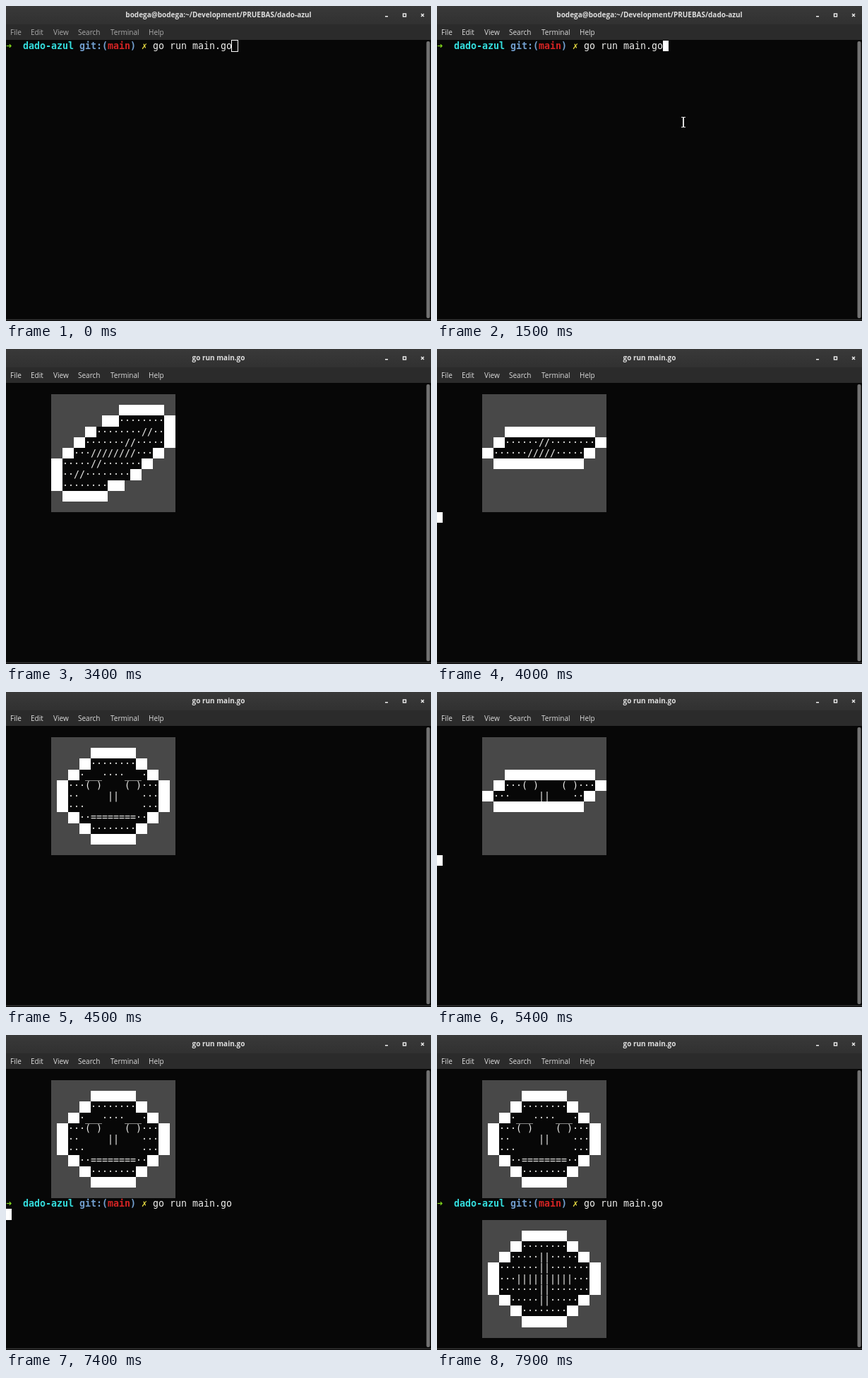
An HTML page with a canvas that plays this animation: 602 px wide and 446 px high, repeating every 8 s.

```html
<!DOCTYPE html>
<html>
<head>
<meta charset="utf-8">
<style>
  html, body { margin: 0; width: 602px; height: 446px; overflow: hidden; background: #070707; }
  canvas { display: block; }
</style>
</head>
<body>
<canvas id="stage" width="602" height="446"></canvas>
<script>
const ctx = document.getElementById('stage').getContext('2d');
const LOOP = 8000, CELL = 8;
const MONO = '13.3px "DejaVu Sans Mono", monospace';
const UI = '"Open Sans", "Noto Sans", sans-serif';
const PROJECT = 'dado-azul', COMMAND = 'go run main.go';
const SHELL_TITLE = 'bodega@bodega:~/Development/PRUEBAS/' + PROJECT;
const MENU = [['File', 6], ['Edit', 35], ['View', 67], ['Search', 102], ['Terminal', 148], ['Help', 202]];

// '#' is a white cell, cells between the rims are black, the rest is grey.
const round = (...face) => [
  '', '       ########', '     ##········##',
  ...face.map((text, i) => ' '.repeat([3, 1, 1, 1, 3][i]) + '##' + text + '##'),
  '     ##········##', '       ########', ''];
const tilted = (...face) => [
  '', ' '.repeat(12) + '########', ' '.repeat(9) + '###········##',
  ...face.map((text, i) => ' '.repeat([6, 4, 2, 0, 0][i]) + '##' + text + '##'),
  '##········###', '  ########', ''];
const flat = (upper, lower) => [
  '', '', '', '    ' + '#'.repeat(16), '  ##' + upper + '##',
  '##' + lower + '##', '  ' + '#'.repeat(16), '', '', '', ''];

const CROSS = round('·····||·····', '·······||·······', '···||||||||||···', '·······||·······', '·····||·····');
const CROSS_TILTED = tilted('········//··', '·······//·····', '···////////···', '·····//·······', '··//········');
const CROSS_FLAT = flat('······//········', '······/////·····');
const FACE = round('·___····___·', '···( )    ( )···', '··     ||    ···', '···          ···', '··========··');
const FACE_TILTED = tilted('···__····__·', '···( )    ( )·', '··     ||  ···', '··          ··', '··=======···');
const FACE_FLAT = flat('···( )    ( )···', '···     ||    ··');
const TOSS = [CROSS_TILTED, CROSS_FLAT, FACE, FACE_TILTED, FACE_FLAT, FACE];

const rowY = row => Math.round(48.8 + 15.2 * row);

function box(color, x, y, w, h) {
  ctx.fillStyle = color;
  ctx.fillRect(x, y, w, h);
}

function cells(color, col, row, count) {
  box(color, col * CELL, rowY(row), count * CELL, rowY(row + 1) - rowY(row));
}

function write(text, col, row, color = '#eeeeec', weight = '') {
  ctx.font = weight + ' ' + MONO;
  ctx.fillStyle = color;
  ctx.fillText(text, col * CELL, rowY(row) + 12);
}

function prompt(row, command) {
  write('➜', 0, row, '#82d81c', 'bold');
  write(PROJECT, 3, row, '#34dede', 'bold');
  write('git:(', 13, row, '#729fcf', 'bold');
  write('main', 18, row, '#d42424', 'bold');
  write(')', 22, row, '#729fcf', 'bold');
  write('✗', 24, row, '#e4d840', 'bold');
  write(command, 26, row);
}

function coin(lines, top) {
  lines.forEach((line, i) => {
    const start = line.indexOf('#');
    cells('#484848', 8, top + i, 22);
    if (start >= 0) cells('#070707', 8 + start, top + i, line.length - start);
  });
  // Glyphs come last, since underscores reach into the next row.
  lines.forEach((line, i) => [...line].forEach((char, c) => {
    if (char === '#') cells('#fff', 8 + c, top + i, 1);
    else write(char, 8 + c, top + i);
  }));
}

function cursor(col, row, focused) {
  if (focused) return cells('#fff', col, row, 1);
  ctx.strokeStyle = '#fff';
  ctx.lineWidth = 1;
  ctx.strokeRect(col * CELL - .5, rowY(row) - .5, 9, 16);
}

function pointer(t) {
  const ease = x => 1 - (1 - Math.min(1, Math.max(0, x))) ** 2;
  const enter = ease((t - 50) / 850), settle = ease((t - 900) / 500);
  const x = Math.round(388 - 56 * enter + 17 * settle), y = Math.round(16 + 149 * enter);
  box('#ddd', x - 1, y - 7, 2, 14);
  box('#ddd', x - 3, y - 8, 6, 1);
  box('#ddd', x - 3, y + 6, 6, 1);
}

function chrome(title, focused) {
  const bar = ctx.createLinearGradient(0, 0, 0, 26);
  bar.addColorStop(0, '#393939');
  bar.addColorStop(1, '#313131');
  box(bar, 0, 0, 602, 26);
  box('#2b2b2b', 0, 26, 602, 22);
  ctx.font = 'bold 10px ' + UI;
  ctx.fillStyle = '#dedede';
  ctx.textAlign = 'center';
  ctx.fillText(title, 301, 16);
  ctx.textAlign = 'left';
  ctx.font = '10px ' + UI;
  ctx.fillStyle = focused ? '#dcdcdc' : '#ababab';
  for (const [label, x] of MENU) ctx.fillText(label, x, 41);

  box('#eee', 537, 14, 4, 1.5);
  ctx.strokeStyle = '#eee';
  ctx.lineWidth = 1.4;
  ctx.strokeRect(562.5, 11, 4, 4);
  ctx.beginPath();
  ctx.moveTo(588, 11); ctx.lineTo(592, 15);
  ctx.moveTo(592, 11); ctx.lineTo(588, 15);
  ctx.stroke();

  ctx.fillStyle = '#727272';
  ctx.beginPath();
  ctx.roundRect(595.5, 50, 5, 392, 2);
  ctx.fill();
  box('#333', 0, 443.5, 602, 1.5);
}

function draw(t) {
  const focused = t >= 1400;
  const running = t >= 2700 && t < 6000 || t >= 7400;
  box('#070707', 0, 0, 602, 446);
  chrome(running ? COMMAND : SHELL_TITLE, focused);

  let place;
  if (t < 3400) {
    prompt(0, COMMAND);
    if (t >= 2900) coin(CROSS, 2);
    place = t < 2700 ? [40, 0] : t < 2900 ? [0, 1] : [0, 13];
  } else {
    coin(TOSS[Math.min(5, Math.floor((t - 3400) / 500))], 1);
    place = [0, 12];
    if (t >= 6000) {
      prompt(12, t < 7000 ? '' : COMMAND);
      place = t < 7000 ? [26, 12] : t < 7400 ? [40, 12] : t < 7600 ? [0, 13] : [0, 25];
    }
    if (t >= 7600) coin(CROSS, 14);
  }

  // Key presses restart the blink with the cursor lit.
  const lit = t < 2100 || (t >= 7000 ? t < 7900 : t >= 2700 && Math.floor((t - 2700) / 600) % 2 === 0);
  if (lit) cursor(...place, focused);
  if (t >= 100 && t < 2700) pointer(t);
}

function tick() {
  draw(performance.now() % LOOP);
  requestAnimationFrame(tick);
}
tick();
</script>
</body>
</html>
```
